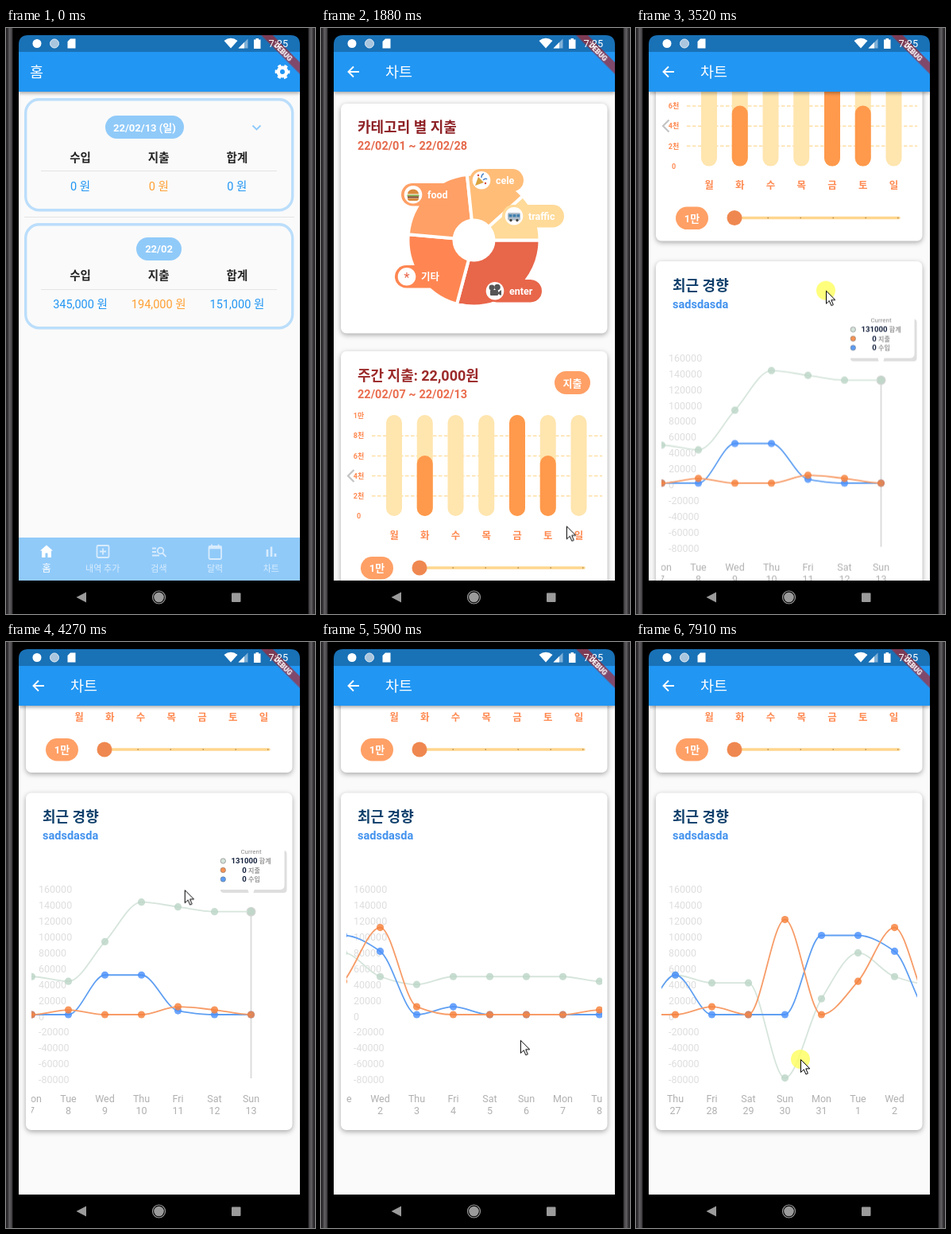
These frames come from a looping animation (389x736 px, 8000 ms). An HTML page:

```html
<!DOCTYPE html>
<html lang="ko">
<head>
<meta charset="utf-8">
<title>가계부</title>
<style>
html, body { margin: 0; width: 100%; height: 100%; overflow: hidden; background: #000; }
svg { display: block; width: 389px; height: 736px; font-family: Roboto, "Noto Sans CJK KR", "Noto Sans CJK JP", sans-serif; }
.b { font-weight: 700; }
.m { text-anchor: middle; }
.w { fill: #fff; }
.chip { font-size: 13px; font-weight: 700; fill: #fff; text-anchor: middle; }
.title { font-size: 18px; font-weight: 700; }
.sub { font-size: 14.5px; font-weight: 700; }
.bar { filter: drop-shadow(0 2px 2px #0005); }
.card { fill: #fff; filter: drop-shadow(0 2px 3px #0005); }
.line { fill: none; stroke-width: 1.8; }

#home, #chart, #scroll, #pan, #cursor, #press { animation: 8s linear infinite; }
#home { animation-name: home; transform-origin: 193px 351px; }
#chart { animation-name: chart; transform-origin: 193px 351px; }
#scroll { animation-name: scroll; }
#pan { animation-name: pan; }
#cursor { animation-name: cursor; }
#press { animation-name: press; animation-timing-function: step-end; }

@keyframes home {
  0%, 18.7% { transform: scale(1); }
  22.5%, 100% { transform: scale(1.05); }
}
@keyframes chart {
  0%, 18.7% { opacity: 0; transform: scale(.85); animation-timing-function: ease-out; }
  20.5% { opacity: 1; transform: scale(.96); animation-timing-function: ease-out; }
  22.5%, 100% { opacity: 1; transform: scale(1); }
}
@keyframes scroll {
  0%, 28.25% { transform: translateY(0); }
  34.5% { transform: translateY(-165px); animation-timing-function: ease-out; }
  39.2% { transform: translateY(-197px); }
  44% { transform: translateY(-439px); }
  47%, 100% { transform: translateY(-543px); }
}
@keyframes pan {
  0%, 61.1% { transform: translateX(0); }
  64.25% { transform: translateX(43px); }
  67.5% { transform: translateX(173px); animation-timing-function: ease-out; }
  73.8%, 80% { transform: translateX(272px); }
  83.125% { transform: translateX(352px); }
  86.5% { transform: translateX(470px); animation-timing-function: ease-out; }
  92.5%, 95.6% { transform: translateX(492px); }
  98.8%, 100% { transform: translateX(523px); }
}
@keyframes cursor {
  0%, 2.5% { transform: translate(338px, 740px); }
  11%, 19% { transform: translate(338px, 672px); }
  23.5% { transform: translate(309px, 626px); }
  28.25% { transform: translate(240px, 408px); }
  34.5%, 35.5% { transform: translate(236px, 243px); }
  39.2% { transform: translate(240px, 572px); }
  44% { transform: translate(239px, 330px); }
  47%, 50.9% { transform: translate(239px, 242px); }
  59.6%, 61.1% { transform: translate(189px, 484px); }
  64.25% { transform: translate(232px, 484px); }
  67.5%, 69% { transform: translate(362px, 478px); }
  73.8%, 76% { transform: translate(250px, 500px); }
  80% { transform: translate(103px, 524px); }
  83.125% { transform: translate(183px, 524px); }
  86.5%, 88% { transform: translate(301px, 524px); }
  92.5%, 95.6% { transform: translate(176px, 524px); }
  98.8%, 100% { transform: translate(207px, 524px); }
}
@keyframes press {
  0%, 19%, 34%, 46.5%, 67.6%, 86.6% { opacity: 0; }
  17.25%, 28.25%, 39.2%, 61.1%, 80%, 95.6%, 100% { opacity: 1; }
}
</style>
</head>
<body>
<svg viewBox="0 0 389 736">
  <defs>
    <clipPath id="screen"><path d="M16 694V21Q16 9 28 9H358Q370 9 370 21V694Z"/></clipPath>
    <clipPath id="plot"><rect x="32" y="790" width="322" height="360"/></clipPath>
    <linearGradient id="edge">
      <stop offset="0" stop-color="#242124"/><stop offset=".3" stop-color="#3a373a"/>
      <stop offset=".45" stop-color="#646164"/><stop offset=".8" stop-color="#4a474a"/>
      <stop offset="1" stop-color="#000"/>
    </linearGradient>
  </defs>
  <rect width="389" height="736"/>
  <rect width="9" height="736" fill="url(#edge)"/>
  <rect width="9" height="736" fill="url(#edge)" transform="matrix(-1 0 0 1 389 0)"/>

  <g clip-path="url(#screen)">
    <g id="home">
      <rect x="16" y="9" width="354" height="685" fill="#fafafa"/>
      <g class="bar"><rect x="16" y="9" width="354" height="71" fill="#2196f3"/></g>
      <rect x="16" y="9" width="354" height="21" fill="#1971b6"/>
      <text x="30" y="62" class="w" font-size="18.5">홈</text>
      <g fill="none" stroke="#fff">
        <circle cx="348" cy="55" r="5.2" stroke-width="4.4"/>
        <circle cx="348" cy="55" r="7.8" stroke-width="3.2" stroke-dasharray="4.1 4.07" stroke-dashoffset="2"/>
      </g>
      <g fill="none" stroke="#bbdefb" stroke-width="3.4">
        <rect x="24.7" y="89.7" width="336" height="139" rx="17"/>
        <rect x="24.7" y="246.7" width="336" height="130" rx="17"/>
      </g>
      <path d="M23 237.500H363M44 179.500H341M44 328.500H341" stroke="#e4e4e4"/>
      <rect x="125" y="110" width="99" height="29" rx="14.500" fill="#90caf9"/>
      <text x="174.500" y="129.500" class="chip">22/02/13 (일)</text>
      <path d="M310.500 122.500l5 5 5-5" fill="none" stroke="#90caf9" stroke-width="1.800"/>
      <rect x="164" y="263" width="57" height="29" rx="14.500" fill="#90caf9"/>
      <text x="192.500" y="282" class="chip">22/02</text>
      <g id="sums" class="m" font-size="14.5"></g>
      <g>
        <rect x="16" y="640" width="354" height="54" fill="#90caf9"/>
        <path class="w" d="M51 649.500l-8 7h2v8.500h4.500v-5.500h3v5.500h4.500v-8.500h2z"/>
        <g fill="none" stroke="#d8ecfd" stroke-width="1.800">
          <rect x="114.500" y="650" width="15" height="15" rx="1.500"/>
          <path d="M122 653.500v8M118 657.500h8"/>
          <path d="M184 653.500h5M184 658h5M184 662.500h9"/>
          <circle cx="194.500" cy="656.500" r="3.800"/><path d="M197 659.500l4.500 4.500"/>
          <rect x="255.500" y="651" width="15.500" height="16" rx="1.500"/>
          <path d="M255 652.500h16.500" stroke-width="3.500"/><path d="M259 648.500v3M267.500 648.500v3"/>
          <path d="M329 655v9M334 651.500v12.500M339 660v4" stroke-width="2.600"/>
        </g>
        <g id="tabs" class="m"></g>
      </g>
    </g>

    <g id="chart">
      <rect x="16" y="9" width="354" height="685" fill="#fafafa"/>
      <g id="scroll">
        <rect class="card" x="25" y="95" width="335.500" height="288.500" rx="7"/>
        <text x="46" y="131" class="title" fill="#8e2226">카테고리 별 지출</text>
        <text x="46" y="153" class="sub" fill="#e56a4d">22/02/01 ~ 22/02/28</text>
        <g id="pie"></g>
        <g transform="translate(116 209.500)">
          <path d="M-7-1a7 6 0 0 1 14 0z" fill="#d98a3d"/><path d="M-7.500 0h15v2h-15z" fill="#7cae45"/>
          <path d="M-7 2h14v2h-14z" fill="#7a3c22"/><path d="M-7 4.500h14q0 3-3 3h-8q-3 0-3-3z" fill="#d98a3d"/>
        </g>
        <g transform="translate(201 191)">
          <path d="M-7 7l4-11 7 7z" fill="#d9a441"/>
          <path d="M1-3q0-4 3-5M3 0q3-3 5-1" fill="none" stroke="#4a86c8" stroke-width="1.500"/>
          <circle cx="-3" cy="-6" r="1.200" fill="#d8483e"/><circle cx="6" cy="4" r="1.200" fill="#d8483e"/>
        </g>
        <g transform="translate(243 236.500)">
          <rect x="-8" y="-4.500" width="16" height="9.500" rx="1.500" fill="#aebdc9"/>
          <path d="M-6.500-2.500h4v3.500h-4zM-1.500-2.500h4v3.500h-4zM3.500-2.500h3.500v3.500h-3.500z" fill="#3f7fae"/>
          <circle cx="-4" cy="5" r="1.700" fill="#444"/><circle cx="4" cy="5" r="1.700" fill="#444"/>
        </g>
        <g transform="translate(219 330)" fill="#555">
          <circle cx="-4" cy="-4" r="3.400"/><circle cx="3" cy="-4.500" r="3.800"/>
          <rect x="-6" y="-1" width="10" height="7" rx="1"/><path d="M4 2l4-3v7l-4-2z"/>
        </g>
        <text x="108" y="319" class="m" font-size="17" fill="#e8664a">*</text>

        <rect class="card" x="25" y="406" width="335.500" height="301" rx="7"/>
        <text x="46" y="443" class="title" fill="#9c2a2a">주간 지출: 22,000원</text>
        <text x="46" y="465" class="sub" fill="#ea6d4e">22/02/07 ~ 22/02/13</text>
        <rect x="294" y="431" width="45" height="29" rx="14.500" fill="#ffa066"/>
        <text x="316.500" y="450.500" class="chip">지출</text>
        <g id="week" class="m b" fill="#ff8a52"></g>
        <path d="M41.500 555l-7.500 7.500 7.500 7.500" fill="none" stroke="#c4c4c4" stroke-width="2.200"/>
        <rect x="50" y="664" width="41" height="28.500" rx="14.200" fill="#ffa066"/>
        <text x="70.500" y="683" class="chip">1만</text>
        <path d="M124 678H331" stroke="#ffd68e" stroke-width="3.500" stroke-linecap="round"/>
        <path d="M165.500 678h1.500m39.500 0h1.500m39.500 0h1.500m39.500 0h1.500m39 0h1.500" stroke="#b98a58" stroke-width="1.500"/>
        <circle cx="124" cy="678" r="9.500" fill="#ef8850"/>

        <rect class="card" x="25" y="732.500" width="335.500" height="423.500" rx="7"/>
        <text x="46" y="769" class="title" fill="#0f3f6b">최근 경향</text>
        <text x="46" y="791" class="sub" fill="#4292ee">sadsdasda</text>
        <g id="scale" font-size="12.500" fill="#dedede"></g>
        <g clip-path="url(#plot)"><g id="pan"></g></g>
      </g>
      <g class="bar"><rect x="16" y="9" width="354" height="71" fill="#2196f3"/></g>
      <rect x="16" y="9" width="354" height="21" fill="#1971b6"/>
      <path d="M48 55H35M41 48.500l-6.500 6.500 6.500 6.500" fill="none" stroke="#fff" stroke-width="1.900"/>
      <text x="81" y="62" class="w" font-size="18.500">차트</text>
    </g>

    <g transform="translate(370 9) rotate(45)">
      <rect x="-40" y="24.100" width="80" height="10.400" fill="#b71c1c" fill-opacity=".63"/>
      <text y="32.500" class="m w" font-size="8.800" font-weight="900">DEBUG</text>
    </g>
    <g class="w">
      <circle cx="39" cy="19.500" r="5.500"/>
      <circle cx="61" cy="19.500" r="5.500" fill="#a9c6de" stroke="#dbe8f3"/>
      <path d="M81 13.500h6.500v12h-10v-8.500z"/>
      <path d="M274.500 16q8.500-6.500 17 0l-8.500 9.500z"/>
      <path d="M304.500 13.500v12h-12z" opacity=".45"/><path d="M300 18v7.500h-7.500z"/>
      <path d="M312 14.500h2.500v-1.500h3.500v1.500h2.500v11.500h-8.500z"/>
      <text x="330.500" y="24" font-size="12.800">7:25</text>
    </g>
  </g>

  <g fill="#9b9b9b">
    <path d="M88.500 715l12.500-6.500v13z"/>
    <circle cx="192.500" cy="715" r="6.300"/><circle cx="192.500" cy="715" r="8" fill="none" stroke="#9b9b9b" stroke-width="1.200"/>
    <rect x="284" y="709.500" width="11.500" height="11.500" rx="1"/>
  </g>

  <g id="cursor">
    <circle id="press" r="12" fill="#ffff5c" fill-opacity=".8"/>
    <path d="M.5.5V16.500l3.800-3.600 2.600 6 2.500-1-2.600-6h5z" fill="#fff" stroke="#000"/>
  </g>
</svg>
<script>
const put = (id, html) => document.getElementById(id).innerHTML += html;
const text = (x, y, str, attrs = '') => `<text x="${x}" y="${y}" ${attrs}>${str}</text>`;
const dot = (x, y, r, attrs) => `<circle cx="${x}" cy="${y}" r="${r}" ${attrs}/>`;

// Home totals
const columns = [['수입', '345,000', '#2196f3'], ['지출', '194,000', '#ffa033'], ['합계', '151,000', '#2196f3']];
columns.forEach(([name, total, color], i) => {
  const x = 93.5 + i * 98.7;
  for (const [y, value] of [[168, '0'], [316, total]]) {
    put('sums', text(x, y, name, 'class="b" fill="#222"') + text(x, y + 36, value + ' 원', `fill="${color}"`));
  }
});
['홈', '내역 추가', '검색', '달력', '차트'].forEach((name, i) =>
  put('tabs', text(51 + i * 70.7, 683, name, i ? 'font-size="11" fill="#d8ecfd"' : 'font-size="12.5" fill="#fff"')));

// Category pie
const cx = 192.5, cy = 266.500;
const at = (deg, r) => {
  const a = deg * Math.PI / 180;
  return `${cx + r * Math.cos(a)} ${cy + r * Math.sin(a)}`;
};
const slices = [
  [0, 105, '#e8664a', 'enter', 207, 316, 71],
  [105, 185, '#ff8652', '기타', 93, 298, 70],
  [185, 264, '#ffa066', 'food', 101, 195, 71],
  [264, 318, '#ffbd78', 'cele', 187, 177, 68],
  [318, 360, '#ffda98', 'traffic', 228, 222, 78]
];
for (const [from, to, color] of slices) {
  put('pie', `<path d="M${cx} ${cy}L${at(from, 83)}A83 83 0 0 1 ${at(to, 83)}Z" fill="${color}" stroke="#fff" stroke-width="4"/>`);
}
put('pie', dot(cx, cy, 27, 'fill="#fff"'));
for (const [, , color, name, x, y, w] of slices) {
  put('pie', `<rect x="${x}" y="${y}" width="${w}" height="28.500" rx="14.2" fill="${color}"/>` +
    dot(x + (name === 'enter' ? 12 : 15), y + 14.2, 11.3, 'fill="#fff"') +
    text(x + (name === 'enter' ? 30 : 33), y + 18.7, name, 'class="b w" font-size="12.5"'));
}

// Weekly bars
['1만', '8천', '6천', '4천', '2천', '0'].forEach((label, i) => {
  const y = 487 + i * 25.2;
  put('week', text(47.5, y + 3.2, label, 'font-size="9"'));
  if (i % 5) put('week', `<path d="M64 ${y}H354" stroke="#ffdfa6" stroke-width="1.5" stroke-dasharray="4.5 2.500"/>`);
});
const column = (x, h, color) => `<rect x="${x - 10}" y="${613 - h}" width="20" height="${h}" rx="10" fill="${color}"/>`;
const spent = [0, 76, 0, 0, 127, 76, 0];
[...'월화수목금토일'].forEach((day, i) => {
  const x = 92 + i * 38.75;
  put('week', column(x, 127, '#ffe5ae') + (spent[i] ? column(x, spent[i], '#ff994c') : '') +
    text(x, 641.5, day, 'font-size="12.5"'));
});

// Trend chart: thousands per day, ending on Feb 13
const zero = 1011, step = 46, lastX = 308.5;
const series = [
  ['#d6e5dc', '#bcd5c7', [0, 50, 40, 40, -80, 20, 78, 48, 38, 48, 48, 48, 48, 42, 92, 142, 136, 130, 130]],
  ['#5f9ff2', '#4a90fa', [0, 50, 0, 0, 0, 100, 100, 80, 0, 10, 0, 0, 0, 0, 50, 50, 5, 0, 0]],
  ['#f79c68', '#f5803a', [0, 0, 10, 0, 120, 0, 42, 110, 10, 0, 0, 0, 0, 6, 0, 0, 10, 6, 0]]
];
const days = series[0][2].length;
const dayX = i => lastX - (days - 1 - i) * step;
const valueY = v => zero - v * .995;

// Monotone cubic through the points, flat at local extremes
function curve(values) {
  const slope = i => {
    const a = values[i] - values[i - 1], b = values[i + 1] - values[i];
    return a * b > 0 ? 2 * a * b / (a + b) : 0;
  };
  let d = `M${dayX(0)} ${valueY(values[0])}`;
  for (let i = 1; i < days; i++) {
    d += `C${dayX(i - 1) + step / 3} ${valueY(values[i - 1] + slope(i - 1) / 3)} ` +
      `${dayX(i) - step / 3} ${valueY(values[i] - slope(i) / 3)} ${dayX(i)} ${valueY(values[i])}`;
  }
  return d;
}

for (let v = 160; v >= -80; v -= 20) put('scale', text(41, valueY(v) + 6.5, v && v + '000'));

let plot = '';
for (let i = 0; i < days; i++) {
  const date = new Date(2022, 0, 26 + i);
  const name = ['Sun', 'Mon', 'Tue', 'Wed', 'Thu', 'Fri', 'Sat'][date.getDay()];
  const attrs = 'class="m" font-size="12.500" fill="#b0b0b0"';
  plot += text(dayX(i), 1121, name, attrs) + text(dayX(i), 1135.5, date.getDate(), attrs);
}
plot += `<path d="M${lastX} 881V1091" stroke="#dcdcdc" stroke-width="2"/>` + dot(lastX, valueY(130), 6, 'fill="#d2d6d3"');
for (const [stroke, fill, values] of series) {
  plot += `<path class="line" d="${curve(values)}" stroke="${stroke}"/>`;
  values.forEach((v, i) => plot += dot(dayX(i), valueY(v), 4.6, `fill="${fill}" fill-opacity=".82"`));
}

// Tooltip on the last day
plot += '<rect x="270" y="805" width="83.5" height="53" rx="4" fill="#dedede"/>' +
  '<rect x="262" y="797" width="88.500" height="57" rx="5" fill="#fff"/><path d="M304 853h9l-2 6h-5z" fill="#fff"/>' +
  text(lastX, 809, 'Current', 'class="m" font-size="8" fill="#8c8c8c"');
[['131000', '합계', '#d6e5dc'], ['0', '지출', '#f79252'], ['0', '수입', '#5a9cf5']].forEach(([value, name, color], i) => {
  const y = 821 + i * 11.5;
  plot += dot(273.3, y - 3, 3.2, `fill="${color}" stroke="#777" stroke-width=".6"`) +
    text(lastX, y, `${value} <tspan font-size="8" fill="#999">${name}</tspan>`, 'class="m b" font-size="9.6" fill="#14213d"');
});
put('pan', plot);
</script>
</body>
</html>
```
